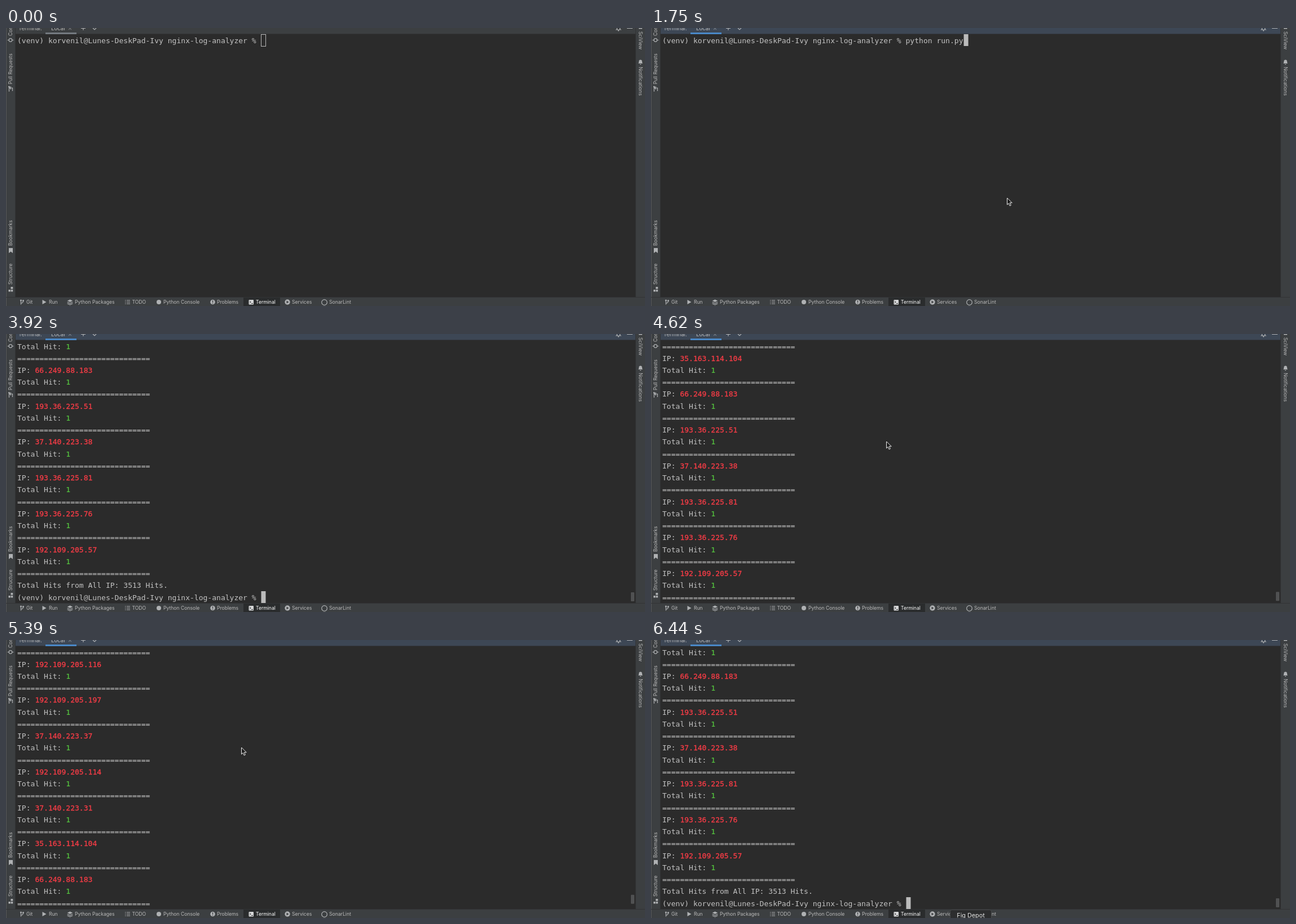
An HTML page for the animation above (6510 ms loop, 1133 by 494 pixels).

```html
<!DOCTYPE html>
<html lang="en">
<head>
<meta charset="utf-8">
<title>Terminal log analysis</title>
<style>
  html, body { margin: 0; width: 100%; height: 100%; overflow: hidden; background: #2b2b2b; }
  svg { display: block; }
  text { white-space: pre; }
  #ui { font: 8.6px Inter, Roboto, sans-serif; fill: #bbb; }
  #head text { font-size: 9.6px; }
  #rows { font: 13.045px "DejaVu Sans Mono", "Noto Sans Mono", monospace; fill: #c2c2c2; }
  .ip { fill: #f53c46; stroke: #f53c46; stroke-width: .3; }
  .hit { fill: #55c43f; stroke: #55c43f; stroke-width: .2; }
  .line { fill: none; stroke: #afb1b3; stroke-width: 1.2; }
  .icon { fill: #afb1b3; }
</style>
</head>
<body>
<svg width="1133" height="494" viewBox="0 0 1133 494">
  <rect width="1133" height="494" fill="#2b2b2b"/>
  <g id="rows"></g>
  <rect id="thumb" x="1108" width="6" height="16" rx="1" fill="#505152"/>
  <rect id="cursor"/>

  <g id="ui">
    <g id="head">
      <rect id="bar" x="17" width="1099" height="10.5"/>
      <rect id="underline" x="70" y="8" width="55" height="3"/>
      <text x="22" y="4">Terminal:</text>
      <text x="80" y="4">Local</text>
      <path class="line" d="M111 -2l5 5m0-5l-5 5" opacity=".45"/>
      <path class="line" d="M133 .5h8M137 -4v8M154 0l3 3 3-3M1101 .5h10"/>
      <circle class="line" cx="1086" cy="1" r="2.700" stroke-width="2"/>
      <path class="line" stroke-width="1.800" d="M1086 4v2M1089 2.500l1.600 1M1083 2.500l-1.600 1"/>
    </g>

    <path fill="#3c3f41" d="M0 0h16.500v494H0zM1117 0h16v494h-16zM0 478.500h1133V494H0z"/>
    <path fill="#555759" d="M0 0h1v494H0z"/>
    <path fill="#323335" d="M16 0h1v478h-1zM1116 0h1v478h-1zM0 478h1133v1H0z"/>
    <rect x="421" y="479" width="65" height="15" fill="#2a2c2d"/>

    <g id="sides"></g>
    <g id="tools"></g>

    <g class="line">
      <circle cx="8" cy="21.500" r="2.800"/>
      <path d="M2.500 21.500h2.700M10.800 21.500h2.700"/>
      <path d="M5.500 104v9M11.500 112v-5.500H7M9 104l-2.500 2.500L9 109"/>
      <path d="M26.500 483.500v8M26.500 489q4 0 4-4.500"/>
      <path d="M214 484h6M214 487h6M214 490h6M211 484h1.500M211 487h1.500M211 490h1.500"/>
      <circle cx="564.500" cy="487.500" r="4.800"/>
    </g>
    <g class="icon">
      <circle cx="5.500" cy="104.500" r="1.400"/>
      <circle cx="26.500" cy="484" r="1.500"/><circle cx="30.500" cy="484.500" r="1.500"/>
      <path d="M5 391h7v9l-3.500-2.800L5 400z"/>
      <path d="M8.500 460h3.800v3.800H8.500zM4.500 465h3.400v3.400H4.500zM8.800 465h3.400v3.400H8.800z"/>
      <path d="M1122 0h6v1.500h-6z"/>
      <path d="M1121 63q1.200-1 1.200-3.500a2.800 3 0 0 1 5.600 0q0 2.500 1.200 3.500zM1123.500 64h3q-1.500 2.500-3 0z"/>
      <path d="M64.500 483l7 4-7 4z"/>
      <path d="M113.500 482.500l4.800 2.300-4.800 2.300-4.800-2.300zM108.700 486.500l4.800 2.200 4.800-2.200v1.300l-4.800 2.200-4.800-2.200zM108.700 489l4.800 2.200 4.800-2.200v1.200l-4.800 2.200-4.800-2.200z"/>
      <circle cx="271" cy="487" r="4"/>
      <circle cx="366.500" cy="487" r="4.300"/>
      <rect x="430.500" y="483" width="8.500" height="8.500" rx="1" fill="#d5d6d7"/>
      <circle cx="499" cy="487" r="4.700"/>
    </g>
    <path d="M366.500 484v3.800M366.500 488.800v1.300" stroke="#3c3f41" stroke-width="1.300"/>
    <path d="M432 485l2 2-2 2M435 489.500h3" stroke="#2a2c2d" fill="none"/>
    <path d="M497.500 484.500l4 2.500-4 2.500z" fill="#3c3f41"/>
  </g>

  <g id="label">
    <rect x="530.500" y="479.500" width="73" height="20" rx="3" fill="#2c2d2e" stroke="#484a4b"/>
    <text x="567" y="492.500" text-anchor="middle" font-family="Inter, sans-serif" font-size="10.800" fill="#e4e4e4">Fig Depot</text>
  </g>
  <path id="pointer" d="M0 0v12l2.700-2.500 2 4.500 2.100-1-2-4.300h3.900z" fill="#1c1c1c" stroke="#eee"/>
</svg>
<script>
const LOOP = 6510, X = 20, COL = 7.854, PITCH = 21.24, COLS = 138, LAST = 21;
const PROMPT = "(venv) korvenil@Lunes-DeskPad-Ivy nginx-log-analyzer % ";
const RULE = "=".repeat(30);
// newest first
const IPS = ["192.109.205.57", "193.36.225.76", "193.36.225.81", "37.140.223.38",
  "193.36.225.51", "66.249.88.183", "35.163.114.104", "37.140.223.31",
  "192.109.205.114", "37.140.223.37", "192.109.205.197", "192.109.205.116"];
const $ = id => document.getElementById(id);
const set = (id, attrs) => {
  for (const k in attrs) $(id).setAttribute(k, attrs[k]);
};
const show = (id, on) => set(id, { visibility: on ? "visible" : "hidden" });
// value of the latest [time, value] entry reached
const at = (t, steps) => steps.reduce((v, s) => t >= s[0] ? s[1] : v, null);

$("tools").innerHTML = [[36, "Git"], [76, "Run"], [122, "Python Packages"], [223.5, "TODO"],
  [279, "Python Console"], [374, "Problems"], [443, "Terminal"], [507, "Services"], [573, "SonarLint"]]
  .map(([x, s]) => `<text x="${x}" y="490"${s == "Terminal" ? ' fill="#fff"' : ""}>${s}</text>`).join("");
$("sides").innerHTML = [[11, 14, -90, "Commit"], [11, 100, -90, "Pull Requests"],
  [11, 387, -90, "Bookmarks"], [11, 456, -90, "Structure"],
  [1121.5, 6, 90, "SciView"], [1121.5, 69, 90, "Notifications"]]
  .map(([x, y, r, s]) => `<text transform="translate(${x} ${y}) rotate(${r})">${s}</text>`).join("");

const COMMANDS = [[0, ""],
  [1050, 'git commit -m "update readme and example"'],
  [1400, 'git commit -m "add total hits for every ip address, coloured output and a short usage guide to the readme"'],
  [1750, "python run.py"]];
const SCROLL = [[2730, 602], [2800, 302], [2870, 0], [4620, 2], [4690, 8], [4760, 16],
  [4830, 19], [4900, 20], [5390, 17], [5460, 7], [5530, 0]];
const POINTER = [[910, [631.5, 302]], [3780, null], [4410, [417.5, 191]], [5670, null],
  [5740, [556.5, 483]], [6020, null]];
const BLINK = [[2870, true], [3360, false], [3920, true], [4480, false], [4970, true],
  [5480, false], [6020, true]];

// output line counted upwards from the last prompt
function outputLine(d) {
  if (d == 0) return PROMPT;
  if (d == 1) return "Total Hits from All IP: 3513 Hits.";
  const k = Math.floor((d - 2) / 3), kind = (d - 2) % 3;
  if (kind == 0) return RULE;
  if (kind == 1) return `Total Hit: <tspan class="hit">${1 + Math.floor(k / 40)}</tspan>`;
  const ip = IPS[k] || `192.109.205.${(k * 37 + 11) % 240 + 10}`;
  return `IP: <tspan class="ip">${ip}</tspan>`;
}

let shown;
function drawRows(lines) {
  const html = lines.map((s, i) => `<text x="${X}" y="${(26.5 + i * PITCH).toFixed(2)}">${s}</text>`).join("");
  if (html != shown) $("rows").innerHTML = shown = html;
}

function placeCursor(col, row, hollow) {
  set("cursor", {
    x: X + col * COL + 0.5, y: Math.round(11 + row * PITCH) + (hollow ? 0.5 : 0),
    width: 8, height: 21,
    fill: hollow ? "none" : "#bbb", stroke: hollow ? "#bbb" : "none"
  });
}

function draw(t) {
  const focus = t >= 560, output = t >= 2730;
  set("bar", { fill: focus ? "#3d4755" : "#3c3f41" });
  set("underline", { fill: focus ? "#4a88c7" : "#747a80" });

  const scroll = at(t, SCROLL) || 0;
  const streaming = output && t < 2870;
  if (output) {
    drawRows(Array.from({ length: LAST + 1 }, (_, r) =>
      streaming && r == LAST ? "" : outputLine(scroll + LAST - r)));
    placeCursor(streaming ? 0 : PROMPT.length, LAST);
    show("cursor", streaming || scroll == 0 && at(t, BLINK));
  } else {
    const line = PROMPT + at(t, COMMANDS);
    drawRows([line.slice(0, COLS), line.slice(COLS)]);
    if (t >= 2590) placeCursor(0, 1);
    else placeCursor(line.length % COLS, Math.floor(line.length / COLS), t < 630);
    show("cursor", true);
  }
  show("thumb", output);
  set("thumb", { y: 459 - (streaming ? 0 : scroll * 0.37) });

  const tip = at(t, POINTER);
  show("pointer", tip);
  if (tip) set("pointer", { transform: `translate(${tip})` });
  show("label", t >= 6090);
  set("label", { opacity: t < 6440 ? 0.9 : 1 });
}

const start = performance.now();
function tick() {
  draw((performance.now() - start) % LOOP);
  requestAnimationFrame(tick);
}
tick();
</script>
</body>
</html>
```
